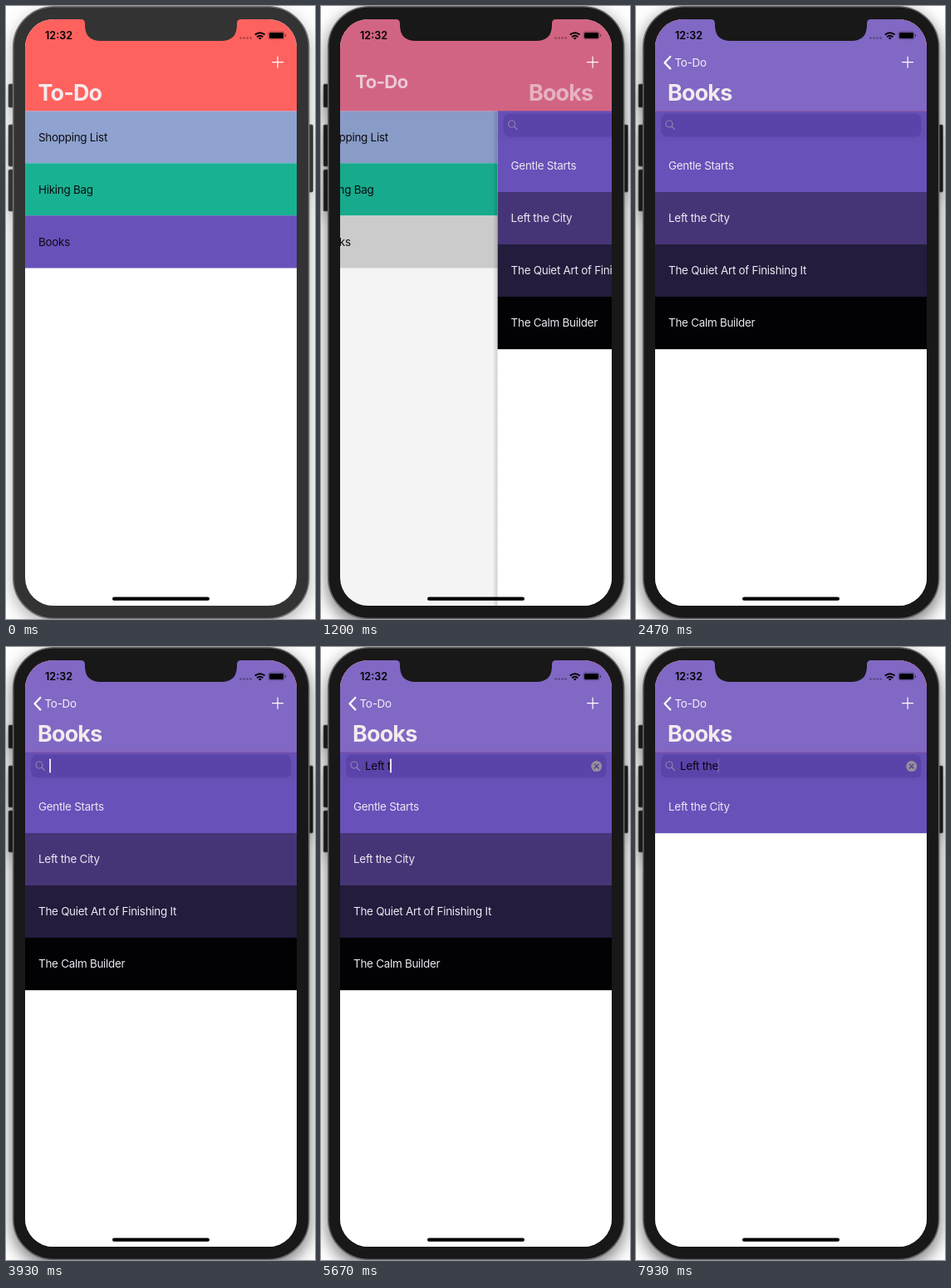
Write an HTML page that moves like this. It is 372 px wide and 738 px high and loops after 8 s.

```html
<!DOCTYPE html>
<html lang="en">
<head>
<meta charset="utf-8">
<title>To-Do list search</title>
<style>
  html, body { margin: 0; width: 100%; height: 100%; overflow: hidden; background: #fff; }
  svg { display: block; width: 100%; height: 100%; }
  text { font: 13.43px Inter, "Open Sans", sans-serif; letter-spacing: -.02em; white-space: pre; }
  .large { font-size: 26.9px; font-weight: 700; letter-spacing: -.03em; fill: #f3eaee; }
  .clock { font-size: 12.6px; font-weight: 600; letter-spacing: 0; }
  .line { fill: none; stroke-linecap: round; stroke-linejoin: round; }
  #phone { --body: #333; --edge: #757575; --shadow: .3; }
  #phone.focused { --body: #181818; --edge: #666; --shadow: .55; }
  #case { filter: drop-shadow(0 7px 10px rgba(0, 0, 0, var(--shadow))); }
  .body { fill: var(--body); }
</style>
</head>
<body>
<svg viewBox="0 0 372 738">
  <defs>
    <clipPath id="screen"><rect x="23" y="16" width="327" height="706" rx="34"/></clipPath>
    <linearGradient id="pageShadow">
      <stop offset="0" stop-opacity="0"/><stop offset="1" stop-opacity=".16"/>
    </linearGradient>
  </defs>
  <g id="phone">
    <g id="case">
      <g class="body" stroke="#555" stroke-width=".8">
        <rect x="3" y="94" width="8" height="28" rx="1.5"/>
        <rect x="3" y="143" width="8" height="50" rx="1.5"/>
        <rect x="3" y="197" width="8" height="50" rx="1.5"/>
        <rect x="362" y="143" width="7.5" height="81" rx="1.5"/>
      </g>
      <rect class="body" x="8.7" y=".7" width="356" height="736.8" rx="49" style="stroke:var(--edge)" stroke-width="1.6"/>
    </g>

    <g clip-path="url(#screen)">
      <rect x="23" y="16" width="327" height="706" fill="#fff"/>
      <g id="lists"></g>
      <rect id="dim" x="23" y="126" width="327" height="596"/>

      <g id="page">
        <rect x="17" y="126" width="6" height="596" fill="url(#pageShadow)"/>
        <rect x="23" y="126" width="327" height="596" fill="#fff"/>
        <rect x="23" y="126" width="327" height="36" fill="#6650b5"/>
        <rect x="30" y="129.5" width="313.5" height="28" rx="7.5" fill="#5a43a9"/>
        <g class="line" stroke="#8f83ad" stroke-width="1.2">
          <circle cx="40" cy="142" r="4"/><path d="M43 145l3.6 3.6"/>
        </g>
        <text id="query" x="53" y="147.7" fill="#08060f"></text>
        <rect id="caret" y="134.5" width="1.8" height="17" rx=".8" fill="#f4f2fa"/>
        <g id="clear">
          <circle cx="331.7" cy="143.6" r="6.5" fill="#958f9b"/>
          <path class="line" d="M329.3 141.2l4.8 4.8m0-4.8l-4.8 4.8" stroke="#4d3a90" stroke-width="1.2"/>
        </g>
        <g id="allBooks"></g>
        <g id="foundBooks"></g>
      </g>

      <rect x="23" y="16" width="327" height="110.3" fill="#fe625f"/>
      <rect id="purple" x="23" y="16" width="327" height="110.3" fill="#8068c4"/>
      <text id="listTitle" class="large">To-Do</text>
      <text id="backLabel" fill="#f3f0fa">To-Do</text>
      <path id="chevron" class="line" d="M41.3 61l-6.8 7.2 6.8 7.2" stroke="#fff" stroke-width="2.3"/>
      <text id="bookTitle" class="large" y="113.6">Books</text>
      <path class="line" d="M320.5 67.6h13.2M327.1 61v13.2" stroke="#fff" stroke-width="1.2"/>

      <text class="clock" x="47" y="40">12:32</text>
      <g fill-opacity=".3">
        <circle cx="282.5" cy="38.6" r="1.4"/><circle cx="286.6" cy="38.6" r="1.4"/>
        <circle cx="290.6" cy="38.6" r="1.4"/><circle cx="294.6" cy="38.6" r="1.4"/>
      </g>
      <path class="line" stroke="#000" stroke-width="1.9" style="stroke-linecap:butt" d="M299.8 34.6q5.9-4.9 11.8 0M302 37.2q3.7-3 7.4 0"/>
      <path d="M303.7 38.6q2-1.5 4 0l-2 2z"/>
      <rect x="316" y="30.9" width="19" height="9" rx="2.5" fill="none" stroke="#000" stroke-opacity=".4" stroke-width=".8"/>
      <rect x="317" y="31.9" width="17" height="7" rx="1.6"/>
      <rect x="336" y="33.9" width="1.2" height="3" rx=".6" fill-opacity=".5"/>
      <rect x="128" y="711.6" width="117" height="4.2" rx="2.1"/>
    </g>
    <path class="body" d="M90 15v1q5 0 5 5v2q0 19 19 19h145q19 0 19-19v-2q0-5 5-5v-1z"/>
  </g>
</svg>
<script>
const LOOP = 8000, STEP = 1000 / 15;
const FOCUS = 1000, SELECT = 1066, PUSH = 1118, TITLE = 1060;
const EDIT = 3600, TYPE = 4400, KEY = 200, FILTER = 6530;
const QUERY = 'Left the', WIDTH = 327, ROW = 63;

const $ = id => document.getElementById(id);
const clamp = v => Math.min(1, Math.max(0, v));
const mix = (a, b, k) => a + (b - a) * k;
const show = (id, visible) => $(id).style.display = visible ? '' : 'none';
const fade = (id, opacity) => $(id).setAttribute('opacity', opacity);

function fillRows(id, top, color, rows) {
  $(id).innerHTML = rows.map(([label, fill], i) => {
    const y = top + i * ROW;
    return `<rect x="23" y="${y}" width="${WIDTH}" height="${ROW + .2}" fill="${fill}"/>
      <text x="39" y="${y + 36.3}" fill="${color}">${label}</text>`;
  }).join('');
}

fillRows('lists', 126.3, '#0c0c10', [
  ['Shopping List', '#8fa2d0'], ['Hiking Bag', '#18b292'], ['Books', '#6851b9']]);
fillRows('allBooks', 161, '#ebe8f2', [
  ['Gentle Starts', '#6851b9'], ['Left the City', '#463576'],
  ['The Quiet Art of Finishing It', '#231c3c'], ['The Calm Builder', '#020104']]);
fillRows('foundBooks', 161, '#ebe8f2', [['Left the City', '#6851b9']]);
const selectedRow = $('lists').querySelectorAll('rect')[2];

// Critically damped spring: 1 at rest before the push, 0 once settled.
function pageOffset(t) {
  const s = Math.max(0, t - PUSH) * .0175;
  return (1 + s) * Math.exp(-s);
}

function caretOpacity(t, typed) {
  if (t < EDIT) return 0;
  if (typed && t < TYPE + KEY * QUERY.length + 400) return 1;
  const peak = typed ? 660 : 3850;
  return clamp(.5 + 2.5 * Math.cos((t - peak) / 1000 * 2 * Math.PI));
}

function drawTitles(t) {
  const x = clamp((t - TITLE) / 350), k = x * x * (3 - 2 * x);
  const place = (id, scale) => $(id).setAttribute('transform',
    `translate(${mix(38.5, 46.5, k)} ${mix(113.6, 73, k)}) scale(${scale})`);
  place('listTitle', mix(1, .5, k));
  place('backLabel', mix(2, 1, k));
  fade('listTitle', 1 - k);
  fade('backLabel', k);
  fade('chevron', clamp(k * 2 - 1));
  fade('purple', k);
  fade('bookTitle', Math.sqrt(k));
  $('bookTitle').setAttribute('x', 38 + WIDTH * (1 - k));
}

function drawSearch(t) {
  const typed = Math.floor(clamp((t - TYPE) / (KEY * QUERY.length)) * QUERY.length + 1e-6);
  const query = $('query');
  query.textContent = QUERY.slice(0, typed);
  $('caret').setAttribute('x', 52.2 + (typed ? query.getComputedTextLength() : 0));
  fade('caret', caretOpacity(t, typed));
  show('clear', typed);
  show('allBooks', t < FILTER);
  show('foundBooks', t >= FILTER);
}

function draw(t) {
  const left = pageOffset(t);
  $('phone').classList.toggle('focused', t >= FOCUS);
  selectedRow.setAttribute('fill', t < SELECT ? '#6851b9' : '#d4d4d4');
  $('lists').setAttribute('transform', `translate(${-.3 * WIDTH * (1 - left)} 0)`);
  fade('dim', .1 * (1 - left));
  $('page').setAttribute('transform', `translate(${WIDTH * left} 0)`);
  show('page', left < 1);
  drawTitles(t);
  drawSearch(t);
}

const start = performance.now();
function tick() {
  const t = (performance.now() - start) % LOOP;
  draw(Math.floor((t + 4) / STEP) * STEP % LOOP);
  requestAnimationFrame(tick);
}
tick();
</script>
</body>
</html>
```
